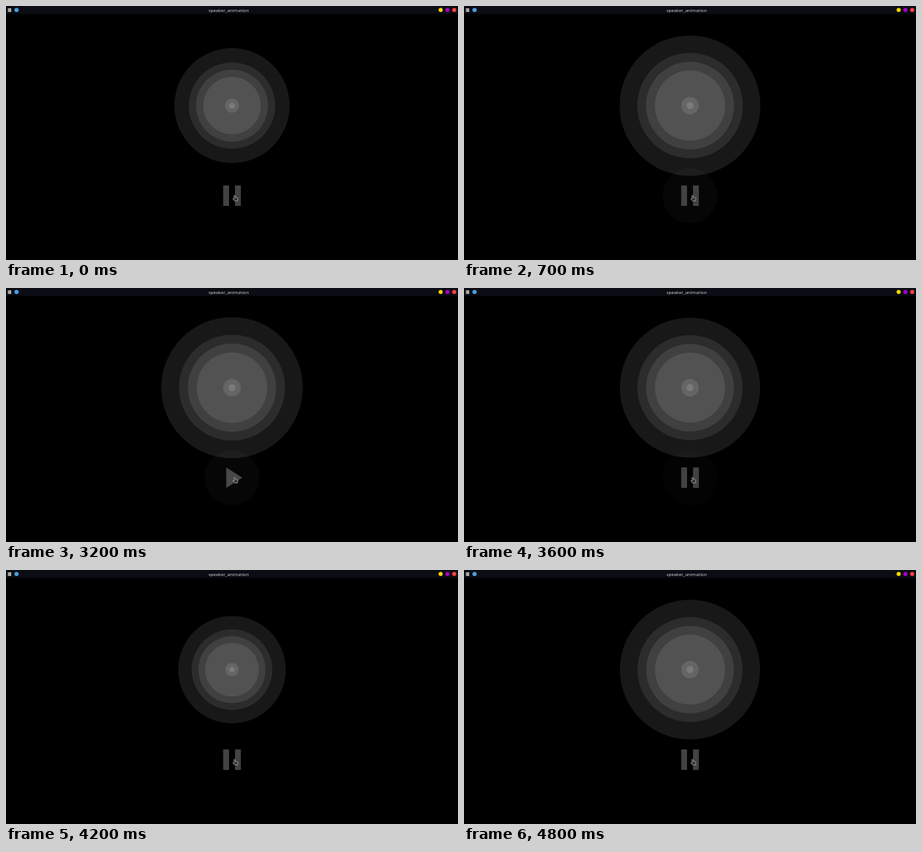
Animation of 600 by 338 pixels, one loop 5 s. Source, as an HTML page:

```html
<!DOCTYPE html>
<html lang="en">
<head>
<meta charset="utf-8">
<title>speaker_animation</title>
<style>
  html, body { margin: 0; width: 100%; height: 100%; overflow: hidden; background: #000; }
  svg { display: block; width: 100%; height: 100%; }
  text { font: 6px "Noto Sans", sans-serif; fill: #c8c8ca; text-anchor: middle; }
  #splash { animation: splash 5s step-end infinite; }
  #pause { animation: pause 5s step-end infinite; }
  #play { animation: play 5s step-end infinite; }
  @keyframes splash {
    0%, 24%, 74% { opacity: 0; }
    14%, 64% { opacity: .025; }
    18%, 66% { opacity: .04; }
    20%, 70% { opacity: .03; }
    22%, 72% { opacity: .015; }
  }
  @keyframes pause { 0%, 66% { opacity: 1; } 18% { opacity: 0; } }
  @keyframes play { 0%, 66% { opacity: 0; } 18% { opacity: 1; } }
</style>
</head>
<body>
<svg viewBox="0 0 600 338">
  <rect width="600" height="338"/>
  <rect width="600" height="10.5" fill="#0b0d14"/>
  <rect x="2.5" y="3" width="4.5" height="5" fill="#a5a5a5"/>
  <circle cx="14" cy="5.3" r="2.8" fill="#4a9fe0"/>
  <text x="295.5" y="7.6">speaker_animation</text>
  <circle cx="577" cy="5.3" r="2.7" fill="#f8d800"/>
  <circle cx="586" cy="5.3" r="2.7" fill="#a800c8"/>
  <circle cx="595" cy="5.3" r="2.7" fill="#ff4343"/>

  <g id="rings"></g>
  <circle id="splash" cx="300" cy="252.5" r="36.5" fill="#fff"/>
  <path id="pause" d="M288.3 238.7h7.8v27.4h-7.8zM304 238.7h7.8v27.4H304z" fill="#424242"/>
  <path id="play" d="M292.4 238.7L313.7 252.4L292.4 266.1z" fill="#484848"/>
  <path d="M302.7 252.2q.9-.6 1.3.4l.5 2 2.5.6q1 .3.8 1.3l-.6 2.9h-3.7l-2.3-2.8q.2-.9 1.2-.3l.6.4z"
        fill="#333" stroke="#b8b8b8" stroke-width=".7" stroke-linejoin="round"/>
</svg>
<script>
  const LOOP = 5000, STEP = 100, HALF_BEAT = 800;
  const MIN = 70.5, MAX = 93.9;
  const RINGS = [
    [1, '#181818'], [.75, '#2c2c2c'], [.625, '#404040'],
    [.5, '#525252'], [.125, '#656565'], [.05, '#7b7b7b']
  ];

  const group = document.getElementById('rings');
  const circles = RINGS.map(([scale, fill]) => {
    const circle = document.createElementNS('http://www.w3.org/2000/svg', 'circle');
    circle.setAttribute('cx', 300);
    circle.setAttribute('cy', 132.6);
    circle.setAttribute('fill', fill);
    group.append(circle);
    return { circle, scale };
  });

  const mix = (a, b, k) => a + (b - a) * Math.min(1, Math.max(0, k));
  const beat = t => mix(MIN, MAX, (1 - Math.cos(Math.PI * t / HALF_BEAT)) / 2);

  function radiusAt(t) {
    if (t <= 700) return beat(t + 270);
    if (t < 3400) return mix(beat(970), MAX, (t - 800) / 300);
    if (t < 3700) return mix(MAX, 87, ((t - 3400) / 300) ** 2);
    if (t < 4000) return mix(87, MIN, Math.sin(Math.PI / 2 * (t - 3700) / 300));
    return beat(Math.min(t, 4800) - 4000);
  }

  function draw(now) {
    const t = Math.floor(now % LOOP / STEP) * STEP;
    const radius = radiusAt(t);
    for (const { circle, scale } of circles) circle.setAttribute('r', radius * scale);
  }

  // Share the CSS clock so rings and button stay in step.
  const clock = document.getElementById('splash').getAnimations()[0];
  function frame() {
    draw(clock.currentTime || 0);
    requestAnimationFrame(frame);
  }
  frame();
</script>
</body>
</html>
```
